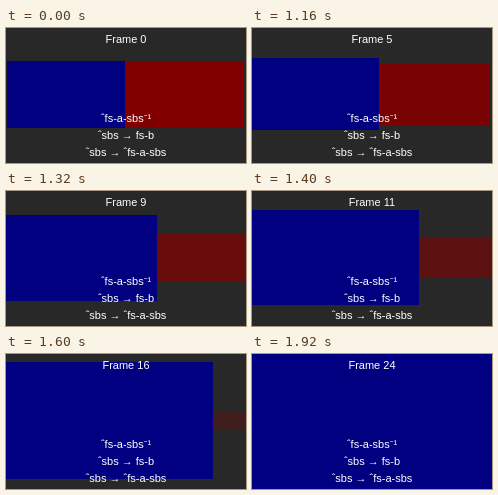
An HTML page for the animation above (2.92 s loop, 240x135 px).

```html
<!DOCTYPE html>
<html lang="en">
<head>
<meta charset="utf-8">
<title>Split panes</title>
<style>
  html, body { margin: 0; width: 100%; height: 100%; overflow: hidden; background: #282828; }
  svg { display: block; width: 100vw; height: 100vh; }
  rect { shape-rendering: crispEdges; }
  text { font: 11px "Liberation Sans", Arial, sans-serif; fill: #fff; text-anchor: middle; }
</style>
</head>
<body>
<svg viewBox="0 0 240 135">
  <rect id="red" fill="#800000"/>
  <rect id="blue" fill="#000080"/>
  <text id="title" x="120" y="15">Frame 0</text>
  <text x="120" y="94">ˆfs-a-sbs⁻¹</text>
  <text x="120" y="111">ˆsbs → fs-b</text>
  <text x="120" y="128">ˆsbs → ˆfs-a-sbs</text>
</svg>
<script>
  const LOOP = 2920, HOLD = 1000, STEP = 40, LAST = 24;
  const red = document.getElementById("red");
  const blue = document.getElementById("blue");
  const title = document.getElementById("title");
  const { floor, ceil, round, max, min, cos, PI } = Math;

  function place(rect, x, y, width, height) {
    const box = { x, y, width: max(0, width), height: max(0, height) };
    for (const name in box) rect.setAttribute(name, box[name]);
  }

  function countAt(ms) {
    return ms < HOLD ? 0 : min(LAST, 1 + floor((ms - HOLD) / STEP));
  }

  function draw(count) {
    const t = max(0, count - 1) / (LAST - 1);
    const s = (1 - cos(PI * t)) / 2;

    // The blue pane grows to fill the stage, snapped outward to whole pixels.
    place(blue, floor(1 - s), floor(33 - 33 * s), ceil(118 + 121.9 * s), ceil(67 + 68.2 * s));

    // The red pane shrinks towards the right edge and fades.
    const left = round(119 + 121 * s), right = round(238 + 2 * s);
    const top = round(33 + 34 * s), bottom = round(100 - 33 * s);
    place(red, left, top, right - left, bottom - top);
    red.setAttribute("opacity", 1 - s);

    title.textContent = "Frame " + count;
  }

  const start = performance.now();
  let shown = -1;
  function tick() {
    const count = countAt((performance.now() - start) % LOOP);
    if (count !== shown) draw(shown = count);
    requestAnimationFrame(tick);
  }
  tick();
</script>
</body>
</html>
```
